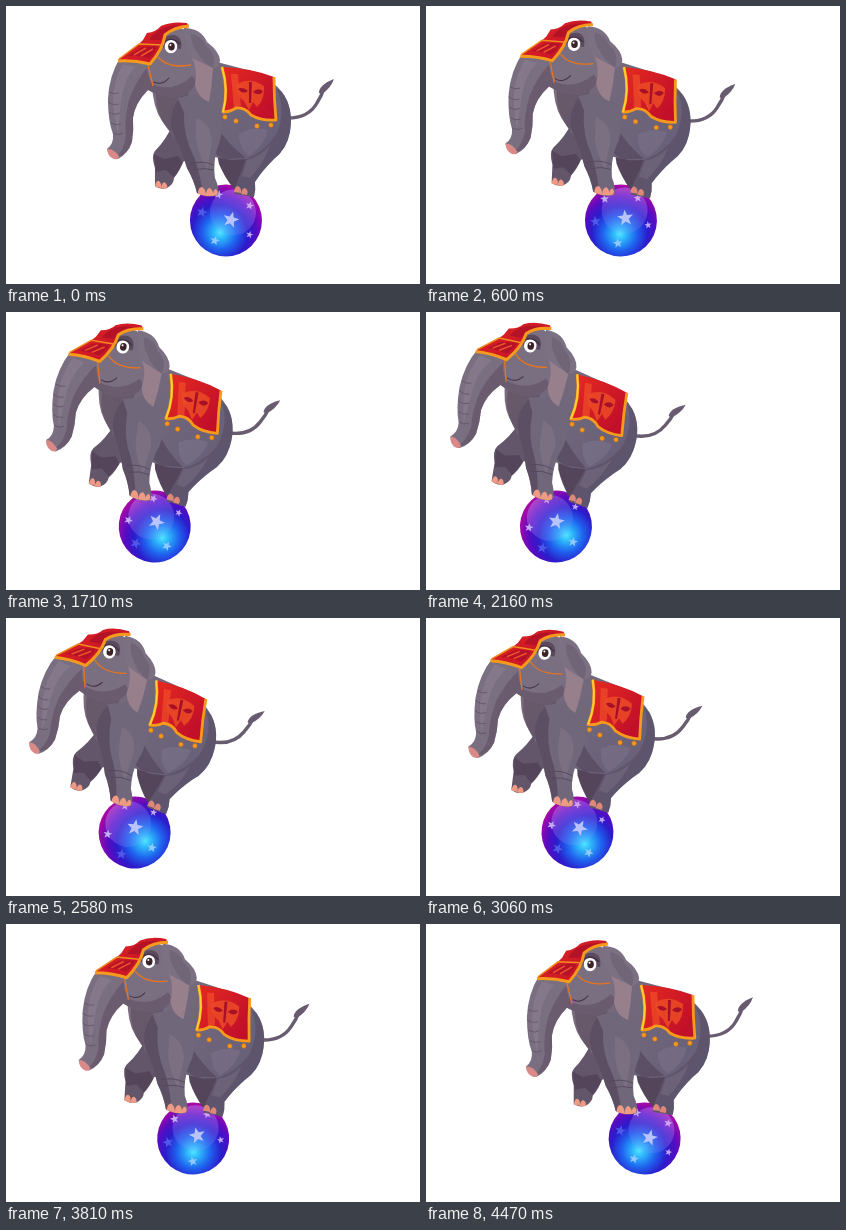
An HTML page for the animation above (4500 ms loop, 414 by 278 pixels).

```html
<!DOCTYPE html>
<html lang="en">
<head>
<meta charset="utf-8">
<title>Elephant on a ball</title>
<style>
  html, body { margin: 0; height: 100%; overflow: hidden; background: #fff; }
  svg { display: block; width: 100vw; height: 100vh; }
</style>
</head>
<body>
<svg viewBox="0 0 414 278">
  <defs>
    <radialGradient id="glow" gradientUnits="userSpaceOnUse" cx="-6" cy="12" r="50">
      <stop offset="0" stop-color="#4fe6ff"/>
      <stop offset=".14" stop-color="#2cb2fa"/>
      <stop offset=".34" stop-color="#1f62ee"/>
      <stop offset=".56" stop-color="#2b1ccb"/>
      <stop offset=".74" stop-color="#560cc2"/>
      <stop offset=".9" stop-color="#940aac"/>
      <stop offset="1" stop-color="#b00aa0"/>
    </radialGradient>
    <linearGradient id="shine" x1=".8" y1="0" x2=".2" y2="1">
      <stop offset="0" stop-color="#d9a0ff" stop-opacity=".4"/>
      <stop offset="1" stop-color="#8a9cff" stop-opacity=".14"/>
    </linearGradient>
    <linearGradient id="skin" x1="0" y1="0" x2="1" y2=".6">
      <stop offset="0" stop-color="#7b6e7e"/>
      <stop offset="1" stop-color="#665f78"/>
    </linearGradient>
    <linearGradient id="red" x1="0" y1="0" x2="1" y2=".6">
      <stop offset="0" stop-color="#e42a20"/>
      <stop offset="1" stop-color="#c20f2a"/>
    </linearGradient>
  </defs>

  <g id="ball">
    <circle r="36" fill="url(#glow)"/>
    <circle cx="7" cy="-8" r="23" fill="url(#shine)"/>
    <g id="stars"></g>
  </g>

  <g id="elephant">
    <!-- tail -->
    <path d="M279 112Q302 113 311 97Q316 89 318 82" fill="none" stroke="#685d70" stroke-width="3.4"/>
    <path d="M313 87Q313 79 328 73Q325 82 316 88Z" fill="#685b70"/>

    <!-- far legs -->
    <path d="M210 142L213 158Q219 172 228 183L238 178L247 150Z" fill="#54455a"/>
    <path d="M167 118Q160 134 149 145Q145 150 149 162L149 180Q154 184 161 182Q168 178 168 172Q174 165 177 156L194 147L190 118Z" fill="#63566a"/>
    <path d="M148 148L158 153L172 150L177 157L168 171L160 164L150 166Z" fill="#4c3b50" opacity=".6"/>
    <path d="M149 181q1-7 4-6q3 2 2 7zM155 182.500q1-7 4-6q3 2 2 6z" fill="#ee9a84"/>

    <!-- body -->
    <path d="M146 78Q147 102 156 115Q167 130 176 141L190 148L226 154L240 153Q236 165 231 177Q227 185 229 188L248 191Q250 184 249 176Q256 165 268 153Q281 143 284 126Q288 102 276 86Q268 76 253 67L211 56Z" fill="url(#skin)"/>
    <path d="M270 82Q281 103 271 127Q260 145 240 153Q236 165 231 177Q227 185 229 188L248 191Q250 184 249 176Q256 165 268 153Q281 143 284 126Q288 102 276 86Z" fill="#544a62" opacity=".5"/>
    <path d="M212 122Q222 138 240 152L220 153Q202 149 205 126Z" fill="#54465c" opacity=".65"/>
    <path d="M233 128Q246 120 262 124Q259 139 243 150Q233 143 233 128Z" fill="#80788e" opacity=".45"/>
    <path d="M241 154Q256 150 264 139Q258 158 244 172L236 170Z" fill="#817788" opacity=".4"/>
    <path d="M150 84Q166 94 184 82Q181 98 171 112Q164 121 166 128Q149 110 150 84Z" fill="#584658" opacity=".5"/>

    <!-- near front leg -->
    <path d="M172 92Q160 112 168 130Q176 145 181 162Q188 174 191 187Q202 193 212 189Q214 183 209 172Q207 157 211 143Q218 128 215 110Q207 90 190 88Z" fill="#70677a"/>
    <path d="M172 93Q160 112 168 130Q176 145 181 162Q188 174 191 187L197 189Q195 170 188 151Q177 130 178 106Z" fill="#54455a" opacity=".7"/>
    <path d="M190 112Q205 117 206 136Q203 150 202 165Q192 148 190 133Z" fill="#857b8a" opacity=".5"/>
    <path d="M184 158Q196 154 208 159M187 164Q198 161 208 164" fill="none" stroke="#54455a" stroke-width=".8"/>
    <path d="M192 188q0-7 4-7q4 2 4 9zM200 190q0-8 4-8q4 3 3 8zM207 190q0-7 3-7q3 3 1 6z" fill="#ee9a84"/>
    <path d="M228 186q1-6 4-6q4 2 3 7zM235 188q1-6 4-6q4 2 2 7z" fill="#dd8878"/>

    <!-- saddle cloth -->
    <path d="M216 61Q245 62 268 71Q268 92 270 114Q255 115 245 109Q239 101 230 102Q224 106 217 106Q223 84 216 61Z" fill="url(#red)"/>
    <path d="M225 68L232 68L235 100L228 102Z" fill="#f4552a" opacity=".6"/>
    <path d="M230 79Q243 70 258 80Q259 93 251 101L247 96L243 104L238 95Q230 90 230 79Z" fill="#ec4a26" opacity=".85"/>
    <path d="M232 83Q237 80 242 85Q237 89 232 83ZM247 86Q252 81 257 85Q254 91 247 86ZM243 76L246 76L245 97L243 97Z" fill="#a80f28"/>
    <path d="M216 61Q223 84 217 106Q224 106 230 102Q239 101 245 109Q255 115 270 114Q268 92 268 71" fill="none" stroke="#f79a1c" stroke-width="2.8" stroke-linejoin="round"/>
    <path d="M216 61Q223 84 217 106" fill="none" stroke="#fcd02f" stroke-width="1.8"/>
    <g fill="#f39a1d" stroke="#d06a16" stroke-width=".5">
      <circle cx="219" cy="111" r="2.3"/><circle cx="230" cy="115" r="2.3"/>
      <circle cx="251" cy="120" r="2.3"/><circle cx="265" cy="119" r="2.3"/>
    </g>

    <!-- head and trunk -->
    <path d="M114 52Q103 70 102 93Q102 115 107 128Q108 138 101 143Q103 152 112 153Q122 148 126 136Q128 124 127 112Q129 97 142 84Q154 91 168 91Q184 90 191 76L188 30Q174 17 156 24Z" fill="#7a6f80"/>
    <path d="M141 62Q130 75 123 94Q118 115 120 130Q118 145 109 152Q122 149 126 136Q128 124 127 112Q129 97 142 84Q154 91 168 91Q184 90 191 76L186 70Q170 85 151 80Q143 78 141 62Z" fill="#5d4c61" opacity=".55"/>
    <path d="M117 58Q107 75 107 98Q109 115 112 128Q114 110 115 94Q118 73 129 61Z" fill="#8d8294" opacity=".5"/>
    <path d="M103 86Q108 89 113 87M102 96Q108 100 113 98M103 106Q108 110 114 107M105 117Q110 120 115 118M107 127Q112 130 117 127" fill="none" stroke="#5d4e63" stroke-width=".7"/>
    <path d="M101 143Q107 142 113 150Q113 154 108 153Q102 151 101 143Z" fill="#d98a88"/>
    <path d="M148 76Q156 80 163 72" fill="none" stroke="#45304a" stroke-width="1" stroke-linecap="round"/>

    <!-- eye -->
    <path d="M156 41Q157 28 168 29Q177 31 175 43Z" fill="#5b4a5d"/>
    <ellipse cx="165" cy="40.500" rx="6.3" ry="6.8" fill="#fff"/>
    <ellipse cx="165.500" cy="40.500" rx="3.3" ry="3.9" fill="#3a2428"/>
    <circle cx="164.500" cy="39" r="1" fill="#fff"/>
    <path d="M158 36Q166 30 174 38" fill="none" stroke="#423045" stroke-width="1.3"/>

    <!-- ear -->
    <path d="M178 22Q195 22 201 36Q213 45 214 54Q214 61 207 62Q206 80 203 96Q192 92 189 79Q191 62 184 50Q176 36 178 22Z" fill="#7c7083"/>
    <path d="M189 79Q192 62 186 52Q198 58 207 62Q206 80 203 96Q192 92 189 79Z" fill="#987f8c"/>
    <path d="M185 28Q196 30 200 40Q211 48 207 62Q196 56 191 46Q185 38 185 28Z" fill="#6a5d71" opacity=".6"/>

    <!-- cap -->
    <path d="M142 59L147 80M152 51Q162 63 185 59" fill="none" stroke="#e8741f" stroke-width="1.3"/>
    <path d="M112 54L133 38L137 34L141 27Q150 26 155 20Q166 15 181 17L183 21Q168 22 159 30Q157 43 144 58Q128 54 112 54Z" fill="url(#red)"/>
    <path d="M122 50L136 41L151 40Q149 47 143 52Q132 49 122 50ZM143 34Q149 23 164 20L174 19Q159 24 155 34Z" fill="#a50f28" opacity=".65"/>
    <path d="M128 49L140 42M135 50L147 43" fill="none" stroke="#f0522c" stroke-width="1.5"/>
    <path d="M183 20Q168 21 159 29Q157 43 144 58Q128 54 112 55" fill="none" stroke="#f79a1c" stroke-width="3" stroke-linejoin="round"/>
    <path d="M113 53L133 38L157 39" fill="none" stroke="#f28c1d" stroke-width="1.5"/>
  </g>
</svg>
<script>
  const LOOP = 4500, TURN = 2400, TRAVEL = 100, LEAN = 10.5, ROLL = 0.85;
  const HOME_X = 220, HOME_Y = 214.5;
  const ball = document.getElementById('ball');
  const elephant = document.getElementById('elephant');

  function star(angle, distance, size, color) {
    const a = angle * Math.PI / 180;
    const points = Array.from({ length: 10 }, (_, i) => {
      const r = i % 2 ? size * 0.42 : size;
      const t = (i * 36 - 75) * Math.PI / 180;
      return [distance * Math.cos(a) + r * Math.cos(t), distance * Math.sin(a) + r * Math.sin(t)]
        .map(v => v.toFixed(2));
    });
    return `<polygon points="${points.join(' ')}" fill="${color}"/>`;
  }

  document.getElementById('stars').innerHTML =
    star(-8, 5, 8.4, '#b9c4ff') +
    star(31, 27.5, 3.8, '#c3a4f4') +
    star(119, 23, 5, '#8fc9ff') +
    star(199, 25.5, 5.6, '#4f58e8') +
    star(254, 27, 4.6, '#c3aef6') +
    star(-32, 28, 4.4, '#d0a4f0');

  function draw(now) {
    const t = now % LOOP;
    const p = t < TURN ? t / TURN : (LOOP - t) / (LOOP - TURN);
    const shift = TRAVEL * p;
    ball.setAttribute('transform',
      `translate(${HOME_X - shift} ${HOME_Y}) rotate(${-ROLL * shift})`);
    elephant.setAttribute('transform',
      `translate(${-shift} 0) rotate(${LEAN * p} ${HOME_X} ${HOME_Y})`);
  }

  const start = performance.now();
  function tick() {
    draw(performance.now() - start);
    requestAnimationFrame(tick);
  }
  tick();
</script>
</body>
</html>
```
